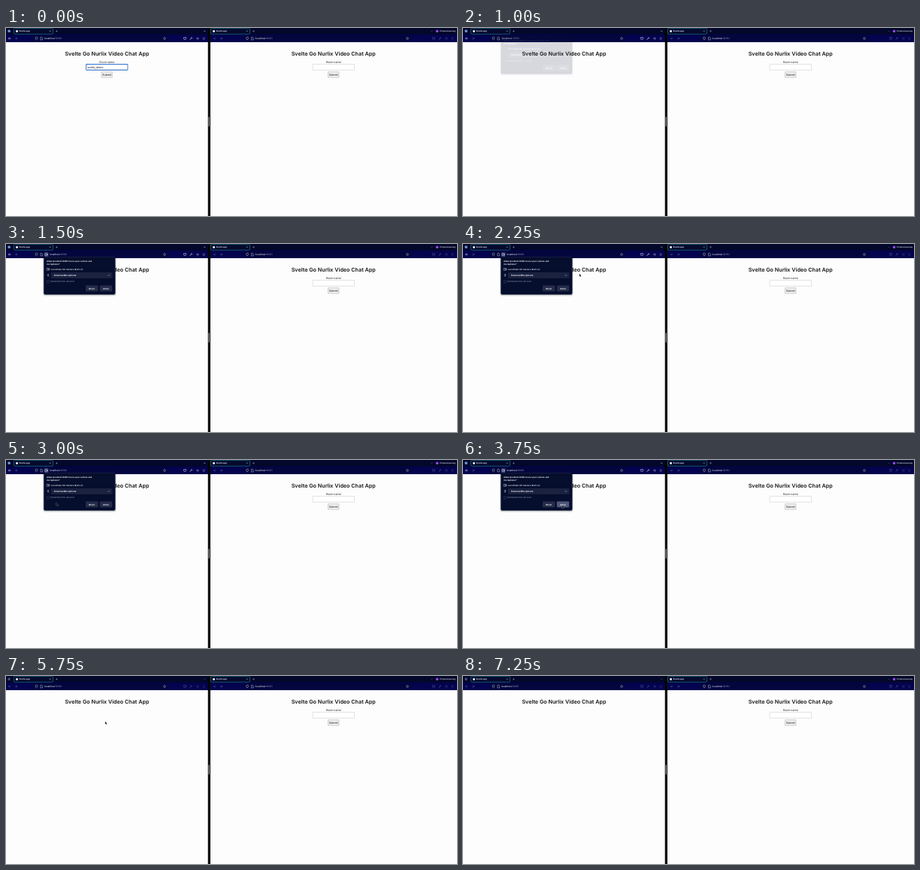
Recreate the animation shown at these times as an HTML page. Size 600x252 px, loop 8 s.

```html
<!DOCTYPE html>
<html lang="en">
<head>
<meta charset="utf-8">
<title>Video chat demo</title>
<style>
  html, body { margin: 0; width: 100%; height: 100%; overflow: hidden; background: #fdfdfd; }
  svg { display: block; width: 100vw; height: 100vh; }
  text { font-family: Inter, "Liberation Sans", sans-serif; text-rendering: geometricPrecision; white-space: pre; }
</style>
</head>
<body>
<svg id="stage" viewBox="0 0 600 252"></svg>
<script>
const LOOP = 8000, STEP = 125;
const stage = document.getElementById('stage');
const BRIGHT = '#dfe4f5', DIM = '#525a8c';

// --- markup helpers ---
const rect = (x, y, w, h, fill, extra = '') =>
  `<rect x="${x}" y="${y}" width="${w}" height="${h}" fill="${fill}" ${extra}/>`;
const text = (x, y, size, fill, str, extra = '') =>
  `<text x="${x}" y="${y}" font-size="${size}" fill="${fill}" ${extra}>${str}</text>`;
const line = (d, color = 'currentColor', width = 0.55, extra = '') =>
  `<path d="${d}" fill="none" stroke="${color}" stroke-width="${width}" ${extra}/>`;
const dot = (x, y, r, fill) => `<circle cx="${x}" cy="${y}" r="${r}" fill="${fill}"/>`;
const ring = (x, y, r, color = 'currentColor') =>
  `<circle cx="${x}" cy="${y}" r="${r}" fill="none" stroke="${color}" stroke-width="0.5"/>`;
const group = (id, body, extra = '') => `<g id="${id}" ${extra}>${body}</g>`;
const MID = 'text-anchor="middle"';
const BOLD = 'font-weight="600"';

function tab(x) {
  return rect(x, 0.4, 52, 7.8, '#050a2e', 'rx="1" stroke="#1b8791" stroke-width="0.6"') +
    dot(x + 4, 4.2, 1.5, '#f4f6ff') +
    text(x + 7, 5.3, 2.9, '#f4f6ff', 'Svelte app', 'font-weight="500"') +
    line(`M${x + 47.4} 3.4l1.6 1.6m0 -1.6l-1.6 1.6`, '#c3c9e4', 0.4) +
    line(`M${x + 55.6} 4.2h2.6m-1.3 -1.3v2.6`, '#a5add0', 0.45);
}

function arrows(x) {
  return line(`M${x + 1.7} 14h-3.4m1.5 -1.5l-1.5 1.5l1.5 1.5`) +
    line(`M${x + 6.6} 14h3.4m-1.5 -1.5l1.5 1.5l-1.5 1.5`, '#59618f');
}

// four toolbar buttons right of the address field
function tools(x) {
  return line(`M${x - 1.6} 12.6h3.2v1.3a1.6 1.6 0 0 1 -3.2 0z`) +
    line(`M${x + 6.8} 15.5l2 -2m-0.5 -1l1.5 1.5`, 'currentColor', 0.9) +
    `<g opacity="0.6">${ring(x + 17, 14, 1.3)}${line(`M${x + 15.4} 14h3.2`)}` +
    `${line(`M${x + 23.6} 13h3m-3 1.1h3m-3 1.1h3`, 'currentColor', 0.5)}</g>`;
}

function fieldIcons(x, starX) {
  return line(`M${x - 1.4} 12.7l1.4 -0.6l1.4 0.6v1.1q0 1.5 -1.4 2.1q-1.4 -0.6 -1.4 -2.1z`, '#bcc3e2', 0.5) +
    line(`M${x + 5.4} 12.3h1.9l0.8 0.8v2.8h-2.7z`, '#bcc3e2', 0.5) +
    ring(starX, 14, 1.4, '#aeb5d8');
}

const address = x => text(x, 15.2, 3.25, '#f6f8ff',
  'localhost<tspan fill="#8b93bd">:8080</tspan>');

function chrome(x, w, fieldX, fieldW) {
  return rect(x, 0, w, 9, '#03072a') + rect(x, 8.8, w, 10.2, '#03034f') +
    rect(fieldX, 10, fieldW, 8, '#03063c', 'rx="1.2"');
}

const title = cx => text(cx, 36.6, 7.2, '#161616', 'Svelte Go Nurlix Video Chat App', `${MID} ${BOLD}`);

function form(cx, focused) {
  const edge = focused
    ? 'rx="0.8" stroke="#1d62c9" stroke-width="1.1" stroke-dasharray="1.6 0.4"'
    : 'rx="0.4" stroke="#c4c4c4" stroke-width="0.5"';
  return text(cx, 47.2, 3.6, '#222', 'Room name', MID) +
    rect(cx - 27.7, 48.6, 55.4, 7.8, '#fff', edge) +
    (focused ? text(cx - 26, 53.6, 3.6, '#111', 'svelte_demo') : '') +
    rect(cx - 7.2, 58.8, 14.4, 7.5, '#efefef', 'rx="0.3" stroke="#a8a8a8" stroke-width="0.5"') +
    text(cx, 63.8, 3.6, '#111', 'Submit', MID);
}

function button(id, x, label) {
  return rect(x, 55.4, 16.4, 8.1, '#262c49', `rx="1" id="${id}"`) +
    text(x + 8.2, 60.5, 2.9, '#fff', label, `${MID} ${BOLD}`);
}

function popup() {
  return rect(49.4, 17.6, 97, 52.2, '#000', 'rx="2.5" opacity="0.14"') +
    rect(50.3, 17.4, 95, 50.3, '#050e2c', 'rx="2" stroke="#27304f" stroke-width="0.5"') +
    text(54, 24.3, 2.75, '#fff', 'Allow localhost:8080 to use your camera and', BOLD) +
    text(54, 28.2, 2.75, '#fff', 'microphone?', BOLD) +
    group('devices',
      line('M54.3 32.5h2.4v2.7h-2.4zM56.7 33.6l1.2 -0.8v2.2l-1.2 -0.8', '#e4e8f8', 0.45) +
      line('M55.4 41a0.7 0.7 0 0 1 1.4 0v1a0.7 0.7 0 0 1 -1.4 0zM56.1 42.9v1.1', '#e4e8f8', 0.45)) +
    text(60, 34.9, 2.8, '#f0f2fb', 'LumoPeek HD Camera (Built-in)', 'font-weight="500"') +
    rect(60, 38, 81.5, 7.9, '#1b2240', 'rx="0.9"') +
    text(64, 43, 2.95, '#fff', 'External Microphone', BOLD) +
    line('M135.6 41.4l1.2 1.2l1.2 -1.2', '#d7dcf0', 0.5) +
    rect(54.4, 48.8, 3.2, 3.2, 'none', 'rx="0.5" stroke="#4d567c" stroke-width="0.45"') +
    text(59.5, 51.4, 2.8, '#9aa2be', 'Remember this decision') +
    button('block', 106, 'Block') + button('allow', 124.8, 'Allow');
}

stage.innerHTML =
  rect(0, 0, 600, 252, '#fdfdfd') +
  // left window
  chrome(0, 269, 36, 180) + tab(10.5) +
  group('leftIcons',
    rect(2.5, 2.6, 3.2, 3.2, '#6f9fdc', 'rx="0.6" id="badge"') +
    line('M263 3.6l1.2 1.2l1.2 -1.2') + arrows(5) + tools(238)) +
  fieldIcons(40.5, 211) +
  group('camera', rect(50.8, 11, 5.6, 6, '#343a68', 'rx="0.8"') +
    line('M52 12.8h2.3v2.5h-2.3zM54.3 13.8l1.1 -0.7v2l-1.1 -0.7', '#e6eafa', 0.45)) +
  group('address', address(51)) +
  title(134.4) + group('form', form(134.2, true)) +
  // right window
  chrome(271.5, 329, 316, 223) + tab(272.5) +
  `<g color="${DIM}">${line('M565 3.6l1.2 1.2l1.2 -1.2')}${arrows(278)}${tools(569)}</g>` +
  fieldIcons(321, 534) + address(331.5) +
  dot(573.6, 4.2, 1.7, '#9a4cf0') + text(577, 5.2, 2.6, '#e9ecfa', 'Private browsing', 'font-weight="500"') +
  title(435.7) + form(435.7, false) +
  // divider
  rect(268.7, 0, 3.2, 252, '#000') + rect(269.6, 119, 1.4, 13, '#8d8d8d', 'rx="0.7"') +
  group('popup', popup()) +
  group('cursor', '<path d="M0 0V3.5L0.85 2.8L1.4 4L2 3.7L1.45 2.55H2.5Z" fill="#000" stroke="#fff" stroke-width="0.4" paint-order="stroke"/>');

const el = id => document.getElementById(id);
const show = (id, on) => el(id).setAttribute('display', on ? 'inline' : 'none');
const move = (id, x, y) => el(id).setAttribute('transform', `translate(${x} ${y})`);

// pointer stops: [step, x, y]
const PATH = [
  [14, 167, 60], [15, 166, 54], [16, 163, 48], [17, 159, 43.5], [18, 154.8, 40],
  [19, 147, 45], [20, 138, 50], [21, 112, 53], [22, 88, 56],
  [24, 67, 57.5], [25, 106, 60], [26, 131.9, 61], [57, 131, 61]
];
// popup entry: step -> [opacity, vertical offset, address shift]
const ENTRY = { 8: [0.15, -6, 0.8], 9: [0.6, -4, 1.8], 10: [1, -2, 3], 11: [1, -0.5, 5.5] };

function draw(t) {
  const n = Math.floor(t / STEP);
  const active = n < 41;
  show('form', n < 1);

  const [alpha, dy, shift] = ENTRY[n] || [1, 0, n > 11 && active ? 7 : 0];
  show('popup', n >= 8 && n < 31);
  el('popup').setAttribute('opacity', alpha);
  move('popup', 0, dy);
  show('devices', n > 10);
  el('allow').setAttribute('fill', n >= 28 ? '#50577a' : '#262c49');

  move('address', shift, 0);
  show('camera', shift > 0);
  el('camera').setAttribute('opacity', shift / 7);

  el('leftIcons').setAttribute('color', active ? BRIGHT : DIM);
  el('badge').setAttribute('fill', active ? '#6f9fdc' : '#46507c');

  const stop = PATH.filter(p => p[0] <= n).pop();
  show('cursor', stop && n < 58);
  if (stop) move('cursor', stop[1], stop[2]);
}

const start = performance.now();
function tick() {
  draw((performance.now() - start) % LOOP);
  requestAnimationFrame(tick);
}
tick();
</script>
</body>
</html>
```
